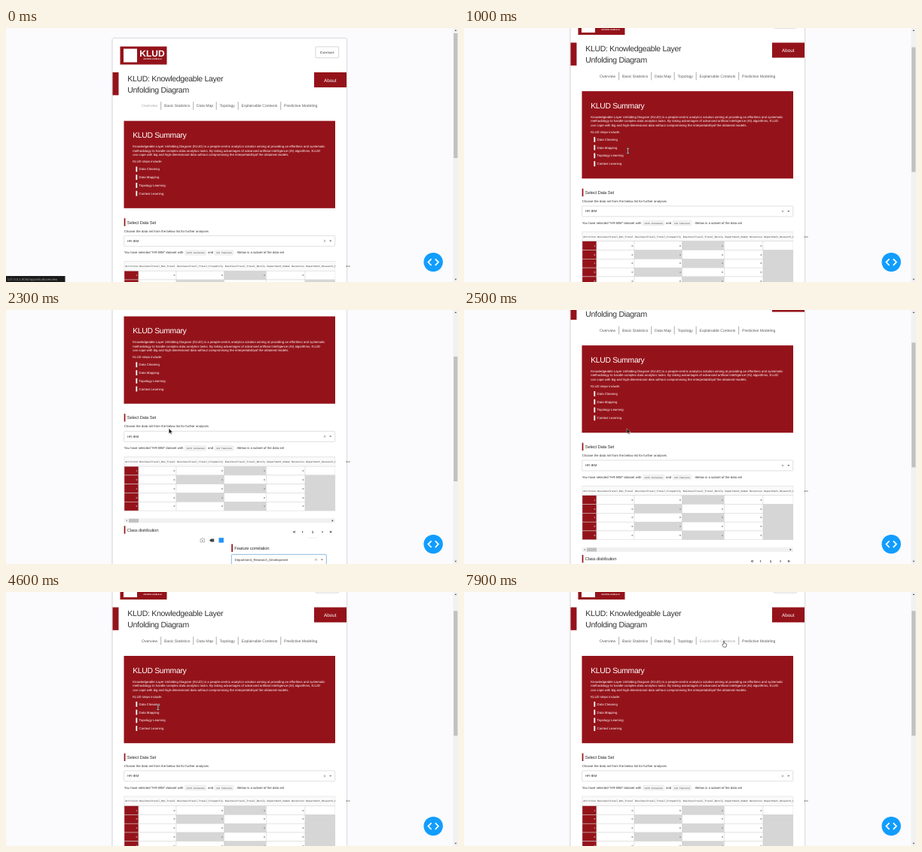
Write an HTML page that moves like this. It is 600 px wide and 338 px high and loops after 8000 ms.

```html
<!DOCTYPE html>
<html lang="en">
<head>
<meta charset="utf-8">
<title>Dashboard tour</title>
<style>
  html, body { margin: 0; width: 100%; height: 100%; overflow: hidden; background: #fbfafc; }
  svg { display: block; }
  text { font-family: "Liberation Sans", Arial, sans-serif; text-rendering: geometricPrecision; white-space: pre; }
  .mono { font-family: "Liberation Mono", monospace; }
  #beam { mix-blend-mode: difference; }
</style>
</head>
<body>
<svg id="stage" width="600" height="338" viewBox="0 0 600 338">
  <g id="page"></g>
  <g id="fixed"></g>
  <g id="link"></g>
  <path id="beam" fill="none" stroke="#fff" stroke-width=".8" d="M-1.5-3.2H1.5M0-3.2V3.2M-1.5 3.2H1.5"/>
  <path id="arrow" fill="#111" stroke="#fff" stroke-width=".4" d="M0 0V7L1.6 5.5L2.7 8L3.8 7.5L2.7 5.1H5Z"/>
  <path id="hand" fill="#fff" stroke="#222" stroke-width=".6" d="M-.7 3.6V-.8Q0-2 .7-.8V2L3.2 2.6Q3.8 2.9 3.7 3.8L3 7H-.6L-2.4 4Q-2 2.8-.7 3.6Z"/>
</svg>
<script>
const RED = '#94131a', INK = '#333', LINE = '#d3d3d3', LOOP = 8000;
const $ = id => document.getElementById(id);
let layer;

function add(tag, attrs) {
  const el = document.createElementNS('http://www.w3.org/2000/svg', tag);
  for (const k in attrs) el.setAttribute(k, attrs[k]);
  return layer.appendChild(el);
}
const rect = (x, y, width, height, fill, more) => add('rect', { x, y, width, height, fill, ...more });
const path = (d, stroke, width = .5, fill = 'none') => add('path', { d, stroke, 'stroke-width': width, fill });
// y is the middle of the capital letters
function text(x, y, str, size = 4.3, fill = INK, more) {
  const el = add('text', { x, y: y + size * .36, 'font-size': size, fill, ...more });
  el.textContent = str;
  return el;
}
const tight = { 'letter-spacing': -.32 };

function section(x, y, title) {
  rect(x, y - 5.2, 1.7, 10.4, RED);
  text(x + 4, y, title, 5.95, INK, { 'letter-spacing': -.2 });
}
function dropdown(x, y, width, value, stroke) {
  rect(x, y - 7, width, 14, '#fff', { stroke, 'stroke-width': .6, rx: 1 });
  text(x + 4.3, y, value);
  const r = x + width;
  path(`M${r - 15} ${y - 1.3}l2.6 2.6m0-2.6l-2.6 2.6`, '#777', .6);
  path(`M${r - 7.6} ${y - .9}h3.4l-1.7 1.9z`, 'none', 0, '#777');
}
function chip(x, y, width, str) {
  rect(x, y - 3.2, width, 6.4, '#f3f3f3', { stroke: '#ddd', 'stroke-width': .4, rx: 1 });
  text(x + width / 2, y, str, 2.95, INK, { class: 'mono', 'text-anchor': 'middle' });
}

// Page header
layer = $('page');
rect(141.5, 13.5, 310.5, 700, '#fff', { rx: 2, style: 'filter:drop-shadow(0 0 1.3px #0005)' });
rect(151.5, 24, 62, 24, RED);
rect(156, 27, 18, 18, '#fff');
text(177.3, 33.2, 'KLUD', 12, '#fff', { 'font-weight': 'bold' });
text(194.5, 41, 'AN INTELLIGIBLE AI', 2.5, '#fff', { 'font-weight': 'bold', 'text-anchor': 'middle' });
rect(411, 24.3, 30.7, 14.8, '#fff', { stroke: '#bbb', 'stroke-width': .6, rx: 1.3 });
text(426.5, 31.7, 'Contact', 4.3, '#555', { 'font-weight': 'bold', 'letter-spacing': .42, 'text-anchor': 'middle' });
rect(141.5, 58.4, 8, 30.4, RED);
rect(409, 58.4, 43, 20, RED);
text(430.3, 68.7, 'About', 6.3, '#fff', { 'text-anchor': 'middle' });
text(161.3, 66.5, 'KLUD: Knowledgeable Layer', 10.5, INK, tight);
text(161.3, 81.5, 'Unfolding Diagram', 10.5, INK, tight);

// Navigation
const nav = [['Overview', 180, 201], ['Basic Statistics', 210, 244], ['Data Map', 253, 275],
  ['Topology', 283.5, 304], ['Explainable Contexts', 312.5, 360], ['Predictive Modeling', 369, 413]]
  .map(([label, x0, x1], i) => {
    if (i) path(`M${x0 - 4.3} 97.5v10.8`, '#777', .6);
    return { x0, x1, el: text(x0, 102.8, label, 5.1) };
  });

// Summary
rect(156.5, 123, 280.5, 116.2, RED);
text(168.2, 141.8, 'KLUD Summary', 10.4, '#fff', tight);
['Knowledgeable Layer Unfolding Diagram (KLUD) is a people-centric analytics solution aiming at providing an effortless and systematic',
 'methodology to handle complex data analytics tasks. By taking advantages of advanced artificial intelligence (AI) algorithms, KLUD',
 'can cope with big and high-dimensional data without compromising the interpretabilityof the obtained models.']
  .forEach((s, i) => text(168.2, 157.2 + i * 5.5, s, 4.3, '#fff'));
text(168.2, 177.3, 'KLUD steps include:', 4.3, '#fff');
['Data Cleaning', 'Data Mapping', 'Topology Learning', 'Context Learning'].forEach((s, i) => {
  const y = 187.3 + i * 10.75;
  rect(172.4, y - 3.4, 1.8, 6.8, '#fff');
  text(176.6, y, s, 4.3, '#fff');
});

// Data set
section(156.7, 257.8, 'Select Data Set');
text(156.7, 269.4, 'Choose the data set from the below list for further analyses');
dropdown(156.7, 282.8, 280, 'HR-IBM', '#ccc');
text(156.7, 298.3, 'You have selected "HR-IBM" dataset with');
chip(237.5, 298.5, 28.5, '1470 instances');
text(268, 298.3, 'and');
chip(277, 298.5, 25, '121 features');
text(304.8, 298.3, '. Below is a subset of the data set');

// Table
const edges = [157, 176, 226, 289.6, 345.4, 397, 437], rowHeight = 11.8, bodyTop = 322.6;
const heads = ['Attrition', 'BusinessTravel_Non_Travel', 'BusinessTravel_Travel_Frequently',
  'BusinessTravel_Travel_Rarely', 'Department_Human Resources', 'Department_Research_Development'];
rect(157, 310, 280, 12.6, '#fafafa', { stroke: LINE, 'stroke-width': .5 });
heads.forEach((s, i) => text(edges[i] + 1.2, 316.3, s, 3.18, INK, { class: 'mono' }));
[1, 0, 1, 0, 0].forEach((attrition, r) => {
  const y = bodyTop + r * rowHeight, frequent = r % 2;
  [attrition, 0, frequent, 1 - frequent, 0, r ? 1 : 0].forEach((v, c) => {
    const fill = c ? (v ? '#d6d6d6' : '#fff') : RED;
    rect(edges[c], y, edges[c + 1] - edges[c], rowHeight, fill, { stroke: LINE, 'stroke-width': .5 });
    if (c < 5) text(edges[c + 1] - 1.6, y + rowHeight / 2, v, 3.2, c ? INK : '#fff', { class: 'mono', 'text-anchor': 'end' });
  });
});
rect(437.2, 308, 14, 75, '#fff');
rect(156.7, 391.8, 280.3, 6, '#f1f1f1');
rect(163, 392.3, 13, 5, '#c1c1c1');
path('M161 393.6v2.4l-1.8-1.2z', 'none', 0, '#999');
path('M432.6 393.4v2.8l2-1.4z', 'none', 0, '#444');
section(156.7, 407, 'Class distribution');
[['«', 382.5], ['‹', 393.5], ['1', 407], ['›', 420], ['»', 431]].forEach(([s, x]) =>
  text(x, s === '1' ? 410 : 409.2, s, s === '1' ? 4.6 : 6.5, INK, { 'font-weight': 'bold', 'text-anchor': 'middle' }));
path('M401 417.5h12', '#ddd', .5);

// Chart toolbar and correlation
path('M258 419.2h1.3l.7-1h1.6l.7 1h1.3v4.2h-5.6z', '#999', .7);
add('circle', { cx: 260.8, cy: 421.2, r: 1, fill: '#999' });
path('M270 421l2-2h4.2v4h-4.2z', 'none', 0, '#444');
rect(282.5, 417.7, 6.4, 6.4, '#2391f5');
section(299.3, 431.2, 'Feature correlation');
dropdown(299.3, 446.8, 126, 'Department_Research_Development', '#3b8bc8');

// Browser parts
layer = $('fixed');
rect(593.6, 0, 6.4, 338, '#f1f1f1');
const thumb = rect(594.2, 7, 5.2, 166, '#c1c1c1');
path('M595.5 4h2.8l-1.4-1.8z', 'none', 0, '#505050');
path('M595.5 333.8h2.8l-1.4 1.8z', 'none', 0, '#505050');
add('circle', { cx: 567.2, cy: 311.6, r: 12.7, fill: '#119dff' });
path('M564.6 307.3l-4.2 4.3l4.2 4.3M569.8 307.3l4.2 4.3l-4.2 4.3', '#fff', 1.7);
layer = $('link');
rect(-1, 330, 79.5, 9, '#1b1b1c');
text(1.8, 334.2, '127.0.0.1:8050/apps/klud/overview', 4.3, '#999');

// [time, scroll]
const scrolls = [[0, -.6], [380, -.6], [400, 0], [900, 0], [1000, 38.5], [1100, 77.7], [1850, 77.7],
  [2000, 114.5], [2400, 114.5], [2600, 38]];
// [time, x, y, pointer shape from here on]
const moves = [[0, 190, 104, ''], [100, 190, 104, 'hand'], [250, 196, 112, 'arrow'], [450, 207, 140, 'beam'],
  [800, 217.5, 163.5, 'beam'], [1850, 217.5, 163.5, 'arrow'], [2000, 216.2, 157.6, 'arrow'],
  [2600, 216.2, 157.6, 'beam'], [3000, 169, 103.5, 'beam'], [3150, 169, 103.5, 'beam'],
  [3500, 186, 123, 'beam'], [4100, 186, 156, 'beam'], [4250, 186, 156, 'beam'], [4650, 204, 153, 'beam'],
  [5100, 186, 164, 'beam'], [5300, 202, 164, 'beam'], [5450, 202, 164, 'arrow'], [5900, 181, 174.3, 'arrow'],
  [6150, 181, 174.3, 'arrow'], [6350, 200, 176, 'arrow'], [6900, 212, 110, 'arrow'], [7150, 220, 72, 'hand'],
  [7250, 222, 66.2, 'hand'], [7900, 345, 66.2, 'hand']];

function sample(keys, t) {
  let i = keys.length - 1;
  while (keys[i][0] > t) i--;
  const a = keys[i], b = keys[i + 1] || a;
  const k = a === b ? 0 : (t - a[0]) / (b[0] - a[0]);
  return a.map((v, j) => typeof v === 'number' ? v + (b[j] - v) * k : v);
}

function draw(now) {
  const t = now % LOOP;
  const [, scrolled] = sample(scrolls, t);
  const [, x, y, shape] = sample(moves, t);
  $('page').setAttribute('transform', `translate(0 ${-scrolled})`);
  thumb.setAttribute('y', 7 + Math.max(0, scrolled) * .48);
  $('link').style.display = t < 400 ? '' : 'none';
  const onNav = Math.abs(y + scrolled - 103) < 7;
  for (const n of nav) n.el.setAttribute('fill', onNav && x >= n.x0 && x <= n.x1 ? '#aaa' : '#5c5c5c');
  for (const id of ['beam', 'arrow', 'hand']) {
    $(id).style.display = id === shape ? '' : 'none';
    $(id).setAttribute('transform', `translate(${x} ${y})`);
  }
  requestAnimationFrame(draw);
}
draw(performance.now());
</script>
</body>
</html>
```
